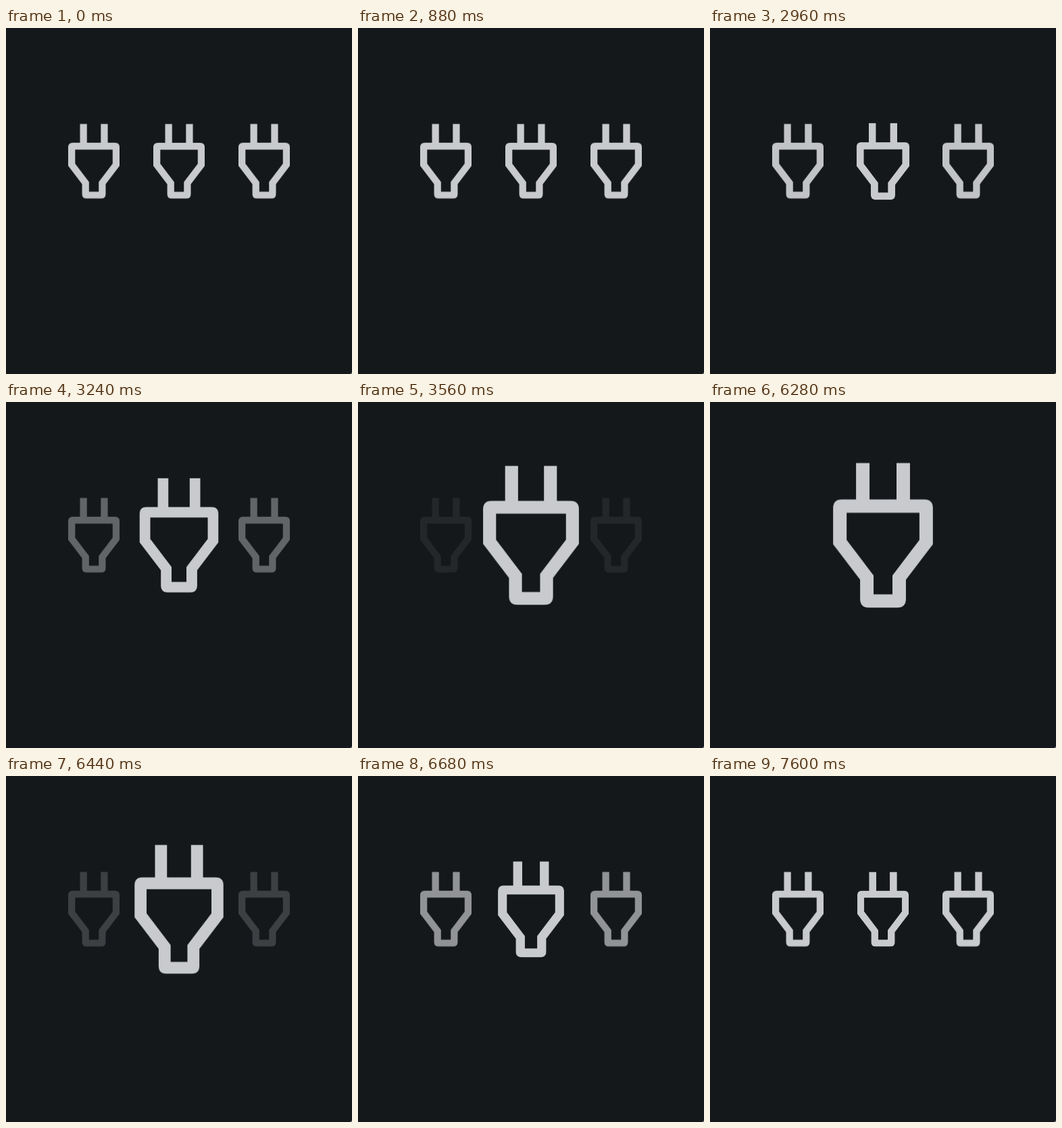
An HTML page that plays this animation: 512x512 px, repeating every 7.68 s.

```html
<!DOCTYPE html>
<html lang="en">
<head>
<meta charset="utf-8">
<title>Plugs</title>
<style>
  html, body { margin: 0; height: 100%; overflow: hidden; background: #14181b; }
  svg { display: block; width: 100%; height: 100%; fill: #c8cacd; }
  .zoom, .fade {
    animation: 7680ms infinite;
    animation-timing-function: ease;
  }
  .zoom { animation-name: zoom; transform-origin: 0 0; }
  .fade { animation-name: fade; }
  /* each transition lasts one second */
  @keyframes zoom {
    0%, 37.956% { transform: scale(.5135); }
    50.977%, 81.641% { transform: scale(1); }
    94.661%, 100% { transform: scale(.5135); }
  }
  @keyframes fade {
    0%, 37.956% { opacity: 1; }
    50.977%, 81.641% { opacity: 0; }
    94.661%, 100% { opacity: 1; }
  }
</style>
</head>
<body>
<svg viewBox="0 0 512 512">
  <defs>
    <path id="plug" fill-rule="evenodd" d="
      M-40-107.3h20v54h40v-54h20v54h21q13 0 13 13V13.3L34 65.8V94.3q0 13-13 13h-42q-13 0-13-13V65.8L-74 13.3V-40.3q0-13 13-13h21z
      M-54-33.5V6.7L-14 59.4V87.5h28V59.4L54 6.7V-33.5z"/>
  </defs>
  <path d="M512 507.500V512h-4.500q4.500 0 4.500-4.500z" fill="#777a7c"/>
  <g class="fade">
    <use href="#plug" transform="translate(130 197.200) scale(.5135)"/>
    <use href="#plug" transform="translate(382 197.200) scale(.5135)"/>
  </g>
  <g transform="translate(256 197.300)">
    <g class="zoom"><use href="#plug"/></g>
  </g>
</svg>
</body>
</html>
```
